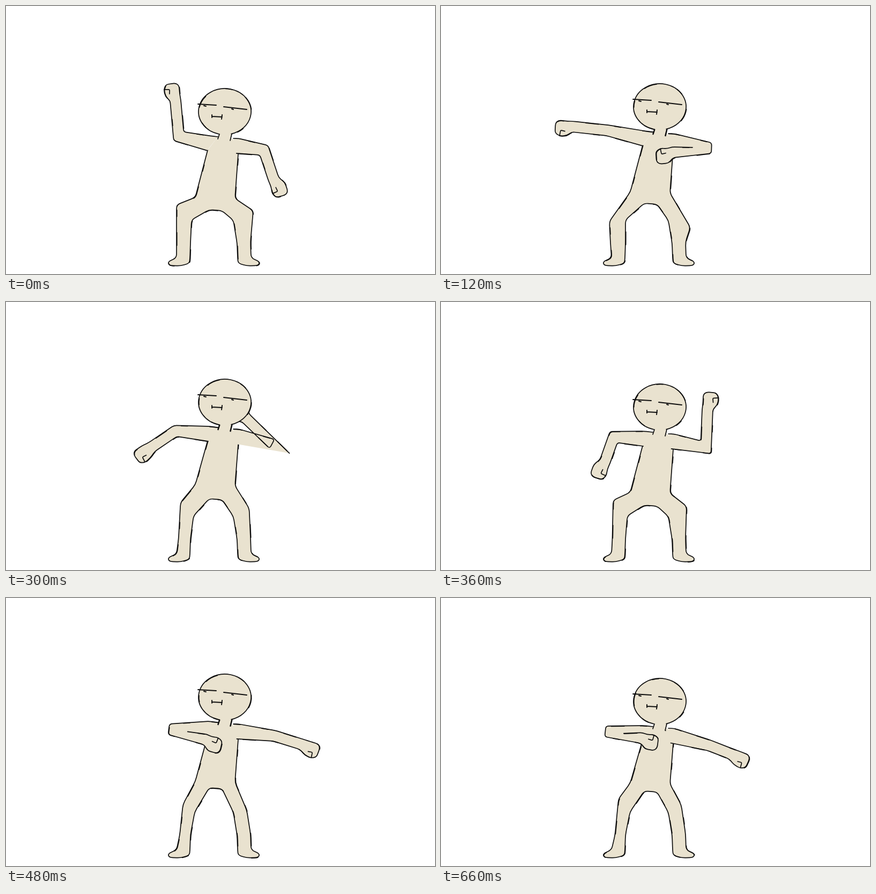
Write an HTML page with a canvas that moves like this. It is 800 px wide and 500 px high and loops after 720 ms.

```html
<!DOCTYPE html>
<html lang="en">
<head>
<meta charset="utf-8">
<title>Dancing figure</title>
<style>
html, body { margin: 0; width: 100%; height: 100%; overflow: hidden; background: #fff; }
canvas { display: block; }
</style>
</head>
<body>
<canvas id="stage" width="800" height="500"></canvas>
<script>
const ctx = document.getElementById('stage').getContext('2d');
const SKIN = '#e9e2cf', INK = '#0d0d0d', STEP = 60, SLOTS = 12;

// Heights of head, hips and crotch, left knee, then elbow and wrist of each arm
const poses = [
  { head: 197, hip: 357, crotch: 380, knee: [318, 371], left: [[322, 243], [316, 176]], right: [[481, 269], [499, 323]] },
  { head: 188, hip: 347, crotch: 368, knee: [314, 402], left: [[310, 232], [245, 225]], right: [[503, 265], [432, 273]] },
  { head: 178, hip: 327, crotch: 355, knee: [330, 378], left: [[310, 229], [252, 227]], right: [[503, 261], [430, 267]] },
  { head: 196, hip: 355, crotch: 379, knee: [321, 370], left: [[322, 252], [306, 297]], right: [[494, 271], [497, 200]] },
  { head: 185, hip: 342, crotch: 354, knee: [330, 385], left: [[305, 245], [372, 264]], right: [[500, 257], [551, 273]] },
  { head: 187, hip: 340, crotch: 358, knee: [331, 383], left: [[307, 243], [368, 258]], right: [[505, 266], [546, 281]] },
  { head: 193, hip: 345, crotch: 360, knee: [331, 375], left: [[307, 249], [374, 261]], right: [[500, 275], [541, 291]] }
];

const mix = (a, b, t) => a + (b - a) * t;
const mixPoint = (a, b, t) => a.map((v, i) => mix(v, b[i], t));
const add = (p, q, k = 1) => [p[0] + q[0] * k, p[1] + q[1] * k];
const toward = (p, q) => {
  const d = Math.hypot(q[0] - p[0], q[1] - p[1]) || 1;
  return [(q[0] - p[0]) / d, (q[1] - p[1]) / d];
};

// The elbow slides while the forearm swings round it by the shorter way
function mixArm([e1, w1], [e2, w2], t) {
  const elbow = mixPoint(e1, e2, t);
  const angle = (e, w) => Math.atan2(w[1] - e[1], w[0] - e[0]);
  const reach = (e, w) => Math.hypot(w[0] - e[0], w[1] - e[1]);
  const turn = angle(e2, w2) - angle(e1, w1);
  const a = angle(e1, w1) + Math.atan2(Math.sin(turn), Math.cos(turn)) * t;
  return [elbow, add(elbow, [Math.cos(a), Math.sin(a)], mix(reach(e1, w1), reach(e2, w2), t))];
}

function poseAt(key) {
  const a = poses[Math.floor(key)], b = poses[Math.ceil(key)], t = key % 1;
  const pose = { knee: mixPoint(a.knee, b.knee, t) };
  for (const part of ['head', 'hip', 'crotch']) pose[part] = mix(a[part], b[part], t);
  for (const arm of ['left', 'right']) pose[arm] = mixArm(a[arm], b[arm], t);
  return pose;
}

// Open line through the points with softened corners
function softPath(points, radius) {
  const path = new Path2D();
  const near = (p, q) => {
    const d = Math.hypot(q[0] - p[0], q[1] - p[1]);
    return add(p, toward(p, q), Math.min(radius, d / 2));
  };
  path.moveTo(...points[0]);
  for (let i = 1; i < points.length - 1; i++) {
    path.lineTo(...near(points[i], points[i - 1]));
    path.quadraticCurveTo(...points[i], ...near(points[i], points[i + 1]));
  }
  path.lineTo(...points.at(-1));
  return path;
}

// Line thickened here and there like a sketch
function ink(path, seed) {
  ctx.lineWidth = 1.7;
  ctx.stroke(path);
  ctx.save();
  ctx.translate(.7, .5);
  ctx.setLineDash([24, 41, 12, 30]);
  ctx.lineDashOffset = seed * 37;
  ctx.stroke(path);
  ctx.restore();
}

// side is -1 for the arm on the left of the picture, 1 for the right
function drawArm(neck, shoulder, [elbow, wrist], side, seed) {
  const normal = u => [side * u[1], -side * u[0]];
  const upper = toward(shoulder, elbow), fore = toward(elbow, wrist);
  const n1 = normal(upper), n2 = normal(fore), r = 10;
  const open = 1 + n1[0] * n2[0] + n1[1] * n2[1];
  const folded = open < .5;
  let miter = add(n1, n2).map(v => v * r / open);
  const size = Math.hypot(...miter);
  if (size > 34) miter = miter.map(v => v * 34 / size);

  const bend = [side * 5 * Math.abs(fore[1]), 5 * Math.abs(fore[0])];
  const hand = add(add(wrist, fore, 17), bend);
  const local = ([along, across]) => add(add(hand, fore, along), n2, across);
  const fist = [[-7, 14], [10, 14], [15, 8], [14, -10], [5, -15], [-8, -13]].map(local);
  const outline = [
    neck, add(shoulder, n1, 14),
    ...(folded ? [add(elbow, n1, r), add(elbow, n2, r)] : [add(elbow, miter)]),
    add(wrist, n2, r), ...fist, add(wrist, n2, -r),
    add(elbow, miter, -1), add(shoulder, n1, -14)
  ];
  ctx.fill(softPath(outline, 5));
  // A folded forearm hides the underside of the upper arm
  ink(softPath(folded ? outline.slice(0, -1) : outline, 5), seed);
  ctx.stroke(softPath([[5, -14], [4, -4], [-4, -5]].map(local), 2));
}

// Outline of a foot from the inner ankle round to the outer one
const foot = (x, side) => [
  [0, 471], [1, 480], [18, 485], [39, 484], [41, 477], [25, 470]
].map(([dx, y]) => [x + side * dx, y]);

function drawBody({ hip, crotch, knee: [kx, ky] }, chin, necks, seed) {
  const outline = [
    [376, chin + 29], [353, hip], [kx, ky], [mix(318, kx, .5), 442],
    ...foot(343, -1).reverse(),
    [344, 442], [187 + kx / 2, 399], [379, crotch], [403, crotch + 2], [424, 400], [431, 443],
    ...foot(432, 1),
    [456, 440], [779 - kx, ky + 11], [427, hip + 2], [433, chin + 36]
  ];
  ctx.fill(softPath([...outline, ...necks], 7));
  ink(softPath(outline, 7), seed);
}

function drawHead(cy, chin, seed) {
  const skull = new Path2D(), neck = new Path2D(), face = new Path2D();
  const lid = cy - 13;
  skull.ellipse(408, cy, 49, 43, 0, Math.PI * .57, Math.PI * 2.42);
  ctx.fill(skull);
  ctx.fillRect(397, chin - 6, 23, 20);
  neck.moveTo(398, chin - 1);
  neck.lineTo(395, chin + 8);
  neck.moveTo(421, chin - 1);
  neck.lineTo(418, chin + 11);
  ink(skull, seed);
  ink(neck, seed);

  const line = (x1, y1, x2, y2) => {
    face.moveTo(x1, lid + y1);
    face.lineTo(x2, lid + y2);
  };
  line(358, -1, 392, 1);
  line(406, 4, 449, 9);
  line(384, 22, 403, 23);
  line(384, 19, 384, 24);
  line(403, 19, 402, 27);
  line(369, 2, 373, 3);
  line(421, 8, 424, 9);
  ctx.lineWidth = 1.9;
  ctx.stroke(face);
}

function draw(key) {
  const pose = poseAt(key), seed = key * 2 + 1, chin = pose.head + 43;
  const neckLeft = [395, chin + 4], neckRight = [424, chin + 7];
  ctx.fillStyle = '#fff';
  ctx.fillRect(0, 0, 800, 500);
  ctx.fillStyle = SKIN;
  ctx.strokeStyle = INK;
  ctx.lineJoin = ctx.lineCap = 'round';
  drawBody(pose, chin, [neckRight, neckLeft], seed);
  drawArm(neckLeft, [378, chin + 16], pose.left, -1, seed);
  drawArm(neckRight, [432, chin + 21], pose.right, 1, seed);
  drawHead(pose.head, chin, seed);
}

// Every second slot is a blend, but the last one is a full pose
function tick() {
  const slot = Math.floor(performance.now() / STEP) % SLOTS;
  draw(slot === SLOTS - 1 ? poses.length - 1 : slot / 2);
  requestAnimationFrame(tick);
}
tick();
</script>
</body>
</html>
```
